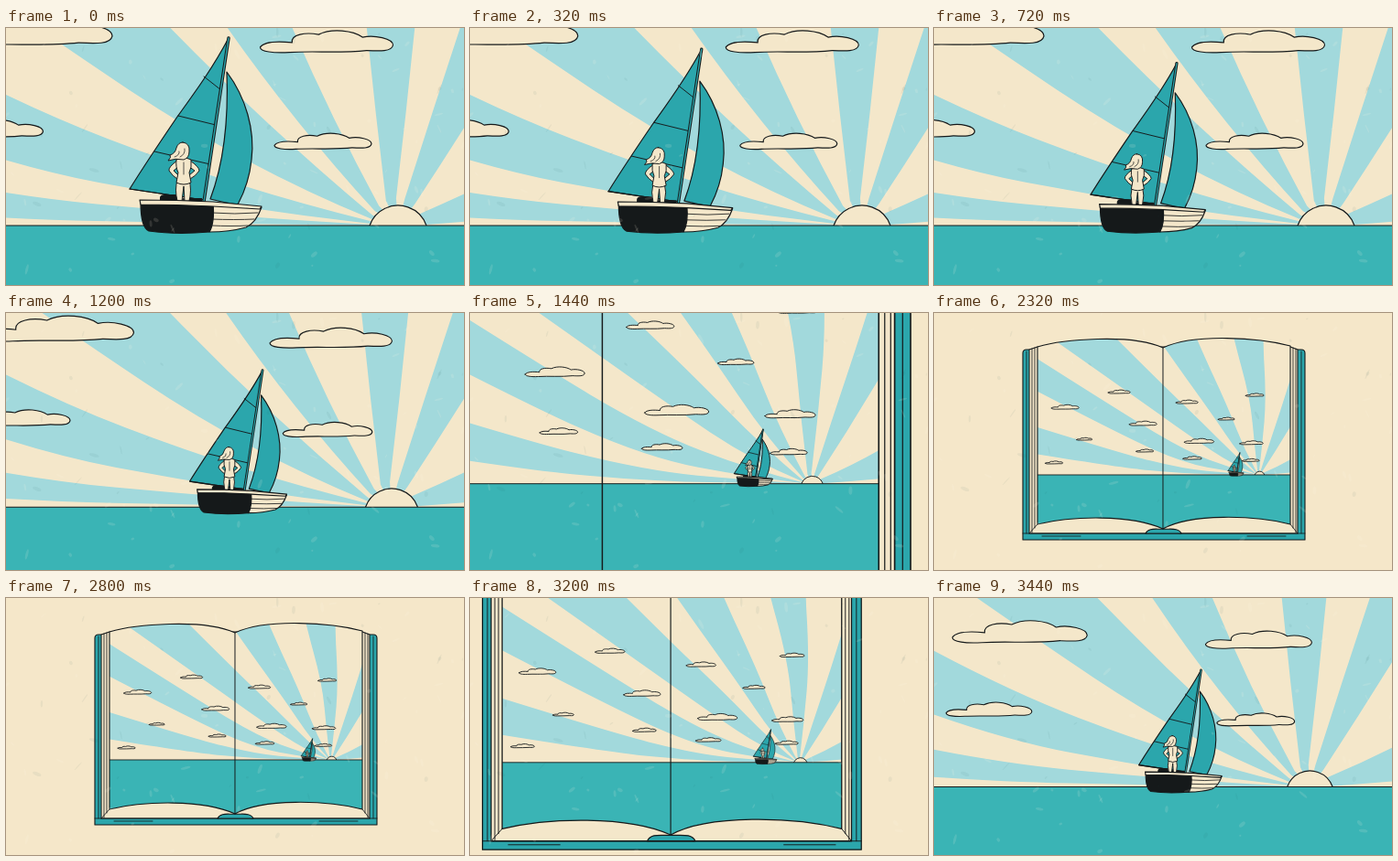
Animation of 500x281 px, one loop 3.52 s. Source, as an HTML page with a canvas:

```html
<!DOCTYPE html>
<html lang="en">
<head>
<meta charset="utf-8">
<title>Sailing into a book</title>
<style>
html, body { margin: 0; width: 100%; height: 100%; overflow: hidden; background: #f5e7c9; }
canvas { display: block; width: 100vw; height: 100vh; }
</style>
</head>
<body>
<canvas id="stage"></canvas>
<script>
const W = 500, H = 281, LOOP = 3520, STEP = 80;
const UNIT = 0.175;            // scene units to book units
const SUN = { x: 355.5, y: 177 };
const CREAM = '#f4e7ca', SKY = '#a2d9dc', SEA = '#3ab4b5', SAIL = '#2ba6ac', INK = '#15191a';

const canvas = document.getElementById('stage');
const ctx = canvas.getContext('2d');
const ratio = Math.max(1, window.devicePixelRatio || 1);
canvas.width = W * ratio;
canvas.height = H * ratio;

// [time, value] steps
const zoom = [[0, 1], [1120, 1], [1200, .92], [1280, .8], [1360, .6], [1440, .38], [1520, .235],
  [1600, UNIT], [3120, UNIT], [3200, .235], [3280, .38], [3360, .6], [3440, .8], [3520, .92]];
const boatX = [[0, -216], [720, -190], [1200, -178], [1280, -173], [1600, -157], [2320, -145],
  [2800, -140], [3120, -157], [3440, -173], [3520, -178]];
const boatSize = [[0, 1], [720, .87], [1200, .8], [1280, .786], [1600, .75], [2320, .68],
  [2800, .65], [3120, .74], [3440, .786], [3520, .8]];
const drift = [[0, 0], [720, 4], [1200, 6], [1280, 8], [1600, 22], [2320, 27], [2800, 30],
  [3120, 22], [3440, 8], [3520, 6]];

// Edge angles of each blue ray, from vertical, at these distances from the sun
const radii = [30, 180, 480, 900, 1700];
const rays = [
  [[-88, -87, -85.5, -81, -77], [-90, -89.5, -89, -87, -84]],
  [[-81, -77, -72, -66, -62], [-86, -84, -81, -74, -68.5]],
  [[-76, -69, -61, -58, -56.5], [-68, -53, -47.5, -47, -46]],
  [[-58, -45, -38, -37, -36], [-44, -31, -25, -25, -24]],
  [[-26, -10, -7, -11, -12], [-4, 5, 5, 1, 1]],
  [[14, 17, 18, 17.5, 17], [38, 34, 32, 33, 33]],
  [[62, 66, 60, 59, 58], [88, 86, 85, 85, 85]]
];

// x, baseline y, width
const clouds = [
  [-78, -190, 145], [-82, -84, 106], [-404, -198, 184], [-446, -97, 117],
  [-1240, -411, 171], [-903, -509, 137], [-1120, -217, 97], [-754, -309, 171],
  [-1309, -69, 109], [-743, -143, 109], [-480, -446, 137], [-234, -343, 103], [-57, -491, 114]
];

const shape = d => new Path2D(d);
const cloudPath = shape('M-.5-.035C-.47-.08-.36-.08-.26-.07C-.27-.13-.16-.15-.06-.13' +
  'C.04-.18.2-.16.27-.11C.36-.13.5-.1.5-.05C.49 0 .4-.005.3-.01C.1.012-.1-.008-.28.004C-.4.01-.5 0-.5-.035Z');

const pages = shape('M113 37C140 29 215 22 250 38C285 22 355 27 389 36V231C350 221 280 219 250 236C215 220 150 222 113 231Z');
const cover = shape('M97 44Q97 40 101 40H401Q405 40 405 44V248H97Z');
const stack = shape('M104 40L113 37H389L397 40V241H104Z');
const stackLines = shape('M107 39V240M110 38V235M392 38V235M395 39V240M97 241H232M268 241H405' +
  'M104 241L113 231M397 241L389 231M101 42V241M401 42V241M118 244H160M342 244H384');
const spine = shape('M231 241C234 234 244 237 250 236C256 237 267 234 270 241Z');

const boat = {
  main: shape('M243 11C225 45 205 72 187 97C170 122 150 152 135 176Q175 182 216 188Z'),
  battens: shape('M216 53L235 68M188 96L229 106M162 135L223 149'),
  jib: shape('M241 48C262 76 272 112 268 144C266 164 260 180 253 193Q238 191 223 187C237 150 243 100 241 48Z'),
  mast: shape('M243 11L216 190'),
  boom: shape('M135 176L216 188'),
  box: shape('M168 190V185Q169 182 173 182H186L189 186H214V191H168Z'),
  bow: shape('M222 191L279 196Q273 213 262 218Q244 223 222 223Z'),
  planks: shape('M224 202Q250 204 275 202M224 209Q250 210 271 209M224 216Q246 217 264 216'),
  stern: shape('M147 191H226Q228 213 222 223Q185 226 156 222Q147 218 147 191Z'),
  rim: shape('M146 188Q186 188 226 190L279 195L277 198L226 195Q186 193 147 193Z')
};

const woman = {
  legs: shape('M187 166Q184 177 187 189H192L194 173L195 189H200Q203 177 200 166Z'),
  arms: shape('M187 145Q177 152 178 156Q182 162 187 165L188 161L183 156L189 151Z' +
    'M201 145Q211 152 211 156Q207 162 201 165L200 161L206 156L199 151Z'),
  torso: shape('M186 144Q194 140 202 144Q203 153 200 158L202 169Q194 173 186 169L188 158Q185 152 186 144Z'),
  hair: shape('M193 125Q201 126 200 135Q200 142 194 144Q185 142 177 145Q181 141 179 139Q185 137 186 131Q188 125 193 125Z'),
  lines: shape('M194 147V160M189 135Q190 139 184 141M195 132Q196 138 190 141')
};

function at(track, t) {
  let i = 1;
  while (i < track.length - 1 && track[i][0] < t) i++;
  const [t0, a] = track[i - 1], [t1, b] = track[i];
  return a + (b - a) * Math.min(1, Math.max(0, (t - t0) / (t1 - t0)));
}

function paint(path, fill, width) {
  if (fill) { ctx.fillStyle = fill; ctx.fill(path); }
  if (width) { ctx.strokeStyle = INK; ctx.lineWidth = width; ctx.stroke(path); }
}

const polar = (r, deg) => {
  const a = deg * Math.PI / 180;
  return [r * Math.sin(a), -r * Math.cos(a)];
};

function trace(path, pts) {
  path.lineTo(...pts[0]);
  for (let i = 1; i < pts.length - 1; i++) {
    const [x, y] = pts[i], [nx, ny] = pts[i + 1];
    const last = i === pts.length - 2;
    path.quadraticCurveTo(x, y, last ? nx : (x + nx) / 2, last ? ny : (y + ny) / 2);
  }
}

const rayPaths = rays.map(([left, right]) => {
  const path = new Path2D();
  const edge = list => list.map((a, i) => polar(radii[i], a));
  path.moveTo(0, 0);
  trace(path, edge(left));
  trace(path, edge(right).reverse());
  path.closePath();
  return path;
});

function seeded(seed) {
  return () => (seed = (seed * 16807) % 2147483647) / 2147483647;
}

const rnd = seeded(71);
const flecks = Array.from({ length: 90 }, () => ({
  x: rnd() * W, y: rnd() * H, w: 1 + rnd() * 5, h: .5 + rnd() * 1.6,
  a: rnd() * 3, light: rnd() < .6
}));

function drawBoat(t, px) {
  const size = at(boatSize, t), lw = px / size;
  ctx.save();
  ctx.translate(at(boatX, t), 7);
  ctx.scale(size, size);
  ctx.translate(-212, -223);
  paint(boat.jib, SAIL, lw);
  paint(boat.main, SAIL, lw);
  paint(boat.battens, null, lw * .8);
  paint(boat.boom, null, lw);
  ctx.strokeStyle = INK;
  ctx.lineWidth = lw * 1.2 + 2;
  ctx.stroke(boat.mast);
  ctx.strokeStyle = SAIL;
  ctx.lineWidth = 1.4;
  ctx.stroke(boat.mast);
  paint(boat.box, INK);
  for (const part of ['legs', 'arms', 'torso', 'hair']) paint(woman[part], CREAM, lw * .8);
  paint(woman.lines, null, lw * .6);
  paint(boat.bow, CREAM, lw);
  paint(boat.planks, null, lw * .7);
  paint(boat.stern, INK, lw);
  paint(boat.rim, CREAM, lw);
  ctx.restore();
}

function drawScene(t, k) {
  const px = (.8 + .4 * k) / k;
  ctx.save();
  ctx.translate(SUN.x, SUN.y);
  ctx.scale(UNIT, UNIT);
  ctx.fillStyle = CREAM;
  ctx.fillRect(-1500, -900, 1750, 900);
  rayPaths.forEach(p => paint(p, SKY));

  const sun = new Path2D();
  sun.arc(0, 10.8, 32.8, -Math.PI * .893, -Math.PI * .107);
  paint(sun, CREAM, px);

  const shift = at(drift, t);
  for (const [x, y, w] of clouds) {
    ctx.save();
    ctx.translate(x + shift, y);
    ctx.scale(w, w);
    paint(cloudPath, CREAM, px / w);
    ctx.restore();
  }

  ctx.fillStyle = SEA;
  ctx.fillRect(-1500, 0, 1750, 400);
  paint(shape('M-1500 0H250'), null, px);
  drawBoat(t, k < .3 ? px * .7 : px);
  ctx.restore();
}

function draw(t) {
  const k = at(zoom, t), s = k / UNIT, lw = 1.1 / Math.sqrt(s);
  ctx.setTransform(canvas.width / W, 0, 0, canvas.height / H, 0, 0);
  ctx.lineJoin = ctx.lineCap = 'round';
  ctx.fillStyle = '#f5e7c9';
  ctx.fillRect(0, 0, W, H);

  ctx.save();
  ctx.translate(340.1 + 87.9 * k, 168.7 + 47.3 * k);
  ctx.scale(s, s);
  ctx.translate(-SUN.x, -SUN.y);
  paint(cover, SAIL, lw);
  paint(stack, CREAM, lw);
  paint(stackLines, null, lw * .75);
  paint(spine, SAIL, lw);
  ctx.save();
  ctx.clip(pages);
  drawScene(t, k);
  ctx.restore();
  paint(pages, null, lw);
  paint(shape('M250 38V236'), null, lw * .9);
  ctx.restore();

  // paper grain
  for (const f of flecks) {
    ctx.fillStyle = f.light ? 'rgba(255,250,230,.13)' : 'rgba(40,90,90,.06)';
    ctx.beginPath();
    ctx.ellipse(f.x, f.y, f.w, f.h, f.a, 0, Math.PI * 2);
    ctx.fill();
  }
}

const start = performance.now();
function frame(now) {
  const t = Math.max(0, now - start) % LOOP;
  draw(Math.floor(t / STEP) * STEP);
  requestAnimationFrame(frame);
}
draw(0);
requestAnimationFrame(frame);
</script>
</body>
</html>
```
